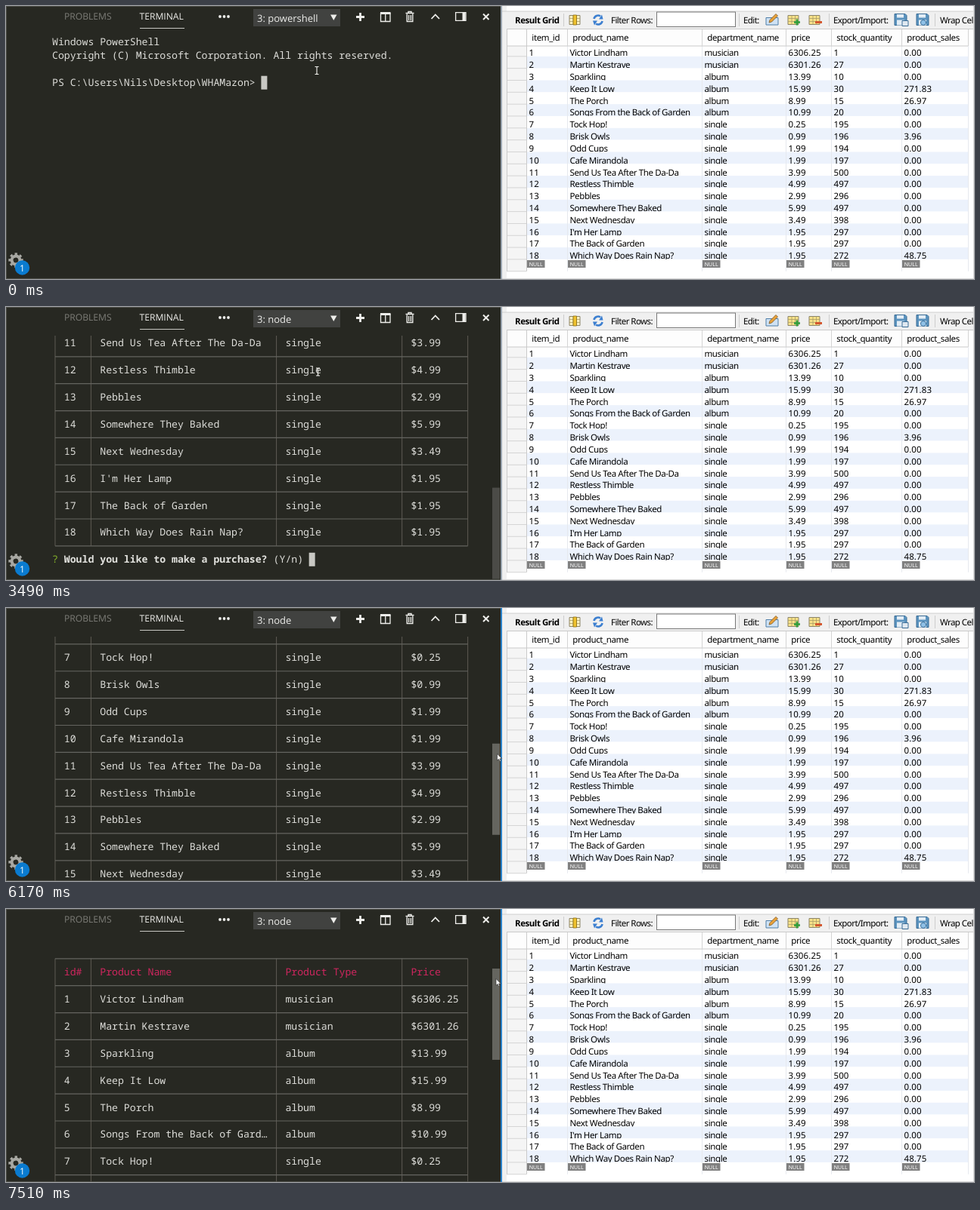
These frames come from a looping animation (1280 by 362 pixels, 8000 ms). An HTML page:

```html
<!DOCTYPE html>
<html lang="en">
<head>
<meta charset="utf-8">
<title>Terminal shop and result grid</title>
<style>
html, body { margin: 0; width: 100%; height: 100%; overflow: hidden; background: #fff; }
svg { display: block; width: 1280px; height: 362px; text-rendering: geometricPrecision; }
.mono { font: 13.18px "Noto Sans Mono", monospace; fill: #dededa; white-space: pre; }
.mono.red { fill: #d0265f; }
.mono.green { fill: #86b42b; }
.mono.yellow { fill: #f4f01c; }
.mono.bold { font-weight: 700; fill: #e2e2de; }
.ui { font: 12.1px "Open Sans", sans-serif; fill: #eeeeeb; }
.grid { font: 11.5px "Noto Sans", sans-serif; fill: #000; letter-spacing: -.38px; }
.grid.num { letter-spacing: .1px; }
.grid.bar { letter-spacing: -.56px; }
.grid.strong { font-weight: 700; letter-spacing: -.45px; }
.null { font: 7px "Noto Sans", sans-serif; fill: #fff; }
</style>
</head>
<body>
<svg id="stage" viewBox="0 0 1280 362" xmlns="http://www.w3.org/2000/svg">
  <defs><clipPath id="view"><rect x="0" y="38" width="643" height="324"/></clipPath></defs>
  <rect width="655" height="362" fill="#272822"/>
  <path d="M0 .5H655M.5 0V362M0 361.5H655" stroke="#4d4e48" fill="none"/>

  <g id="tabs">
    <text class="ui" x="77" y="18.3" style="fill:#7d7d78">PROBLEMS</text>
    <text class="ui" x="176.5" y="18.3">TERMINAL</text>
    <path d="M177 29.5H236" stroke="#c8c8c3"/>
    <g fill="#eeeeeb"><circle cx="283" cy="14" r="1.9"/><circle cx="288.5" cy="14" r="1.9"/><circle cx="294" cy="14" r="1.9"/></g>
    <rect x="327" y="4" width="115" height="23" fill="#414240"/>
    <text class="ui" id="shell" x="332" y="20.5" style="font-size:13px"></text>
    <path d="M429 11.5H437.500L433.250 19Z" fill="#eeeeeb"/>
    <g stroke="#eeeeeb" fill="none">
      <path d="M463 14.500H474M468.500 9V20" stroke-width="2.800"/>
      <path d="M495 9.500H508.500" stroke-width="3"/>
      <path d="M495.500 9V20.500H508V9M501.750 9V20" stroke-width="1.300"/>
      <path d="M528.500 9.500H539.500M532 9V7.500H536V9M530.200 10.500V20.500H537.800V10.500M532.600 12V19M535.400 12V19" stroke-width="1.400"/>
      <path d="M562.500 17L567.750 11.500L573 17" stroke-width="1.800"/>
      <path d="M594.600 8.600H608V19.400H594.600Z" stroke-width="1.300"/>
      <path d="M605.500 9V19" stroke-width="4"/>
      <path d="M631 10.500L638.500 18M638.500 10.500L631 18" stroke-width="2"/>
    </g>
  </g>

  <g clip-path="url(#view)"><g id="doc">
    <g id="intro"></g><g id="command"></g><g id="table"></g><g id="prompt"></g>
    <rect id="caret" width="8" height="18" fill="#c8c8c3"/>
  </g></g>
  <rect id="thumb" x="643" width="10" height="121"/>

  <g id="gear" transform="translate(13 337) rotate(-11.25)">
    <circle r="5.400" fill="none" stroke="#a8a8a3" stroke-width="4"/>
    <circle r="8.200" fill="none" stroke="#a8a8a3" stroke-width="3" stroke-dasharray="3.220 3.220"/>
  </g>
  <circle cx="21.500" cy="347" r="9.700" fill="#0a7bd0"/>
  <text class="ui" x="21.500" y="351.500" text-anchor="middle" style="fill:#fff">1</text>

  <rect x="654" width="626" height="362" fill="#fff"/>
  <rect x="656" width="6" height="362" fill="#f0f0f0"/>
  <rect x="656" y="7" width="624" height="23" fill="#f0f0f0"/>
  <path d="M656 7H1280" stroke="#d0d0d0"/>
  <rect id="edge" x="654" width="2" height="362"/>
  <g id="toolbar"></g>
  <g id="grid"></g>

  <path id="beam" d="M-2.500 -5H-.7L0 -4.300L.7 -5H2.500M0 -4.300V4.300M-2.500 5H-.7L0 4.300L.7 5H2.500" fill="none" stroke="#f4f4f0" stroke-width="1.100"/>
  <path id="arrow" d="M0 0V8.800L2.100 7L3.500 10L4.900 9.400L3.600 6.500H6.300Z" fill="#fff" stroke="#222" stroke-width=".6"/>
</svg>
<script>
const NS = 'http://www.w3.org/2000/svg';
const $ = id => document.getElementById(id);

function add(parent, tag, attrs, content) {
  const el = document.createElementNS(NS, tag);
  for (const k in attrs) el.setAttribute(k, attrs[k]);
  if (content !== undefined) el.textContent = content;
  parent.appendChild(el);
  return el;
}

const items = `Victor Lindham|musician|6306.25|1|0.00
Martin Kestrave|musician|6301.26|27|0.00
Sparkling|album|13.99|10|0.00
Keep It Low|album|15.99|30|271.83
The Porch|album|8.99|15|26.97
Songs From the Back of Garden|album|10.99|20|0.00
Tock Hop!|single|0.25|195|0.00
Brisk Owls|single|0.99|196|3.96
Odd Cups|single|1.99|194|0.00
Cafe Mirandola|single|1.99|197|0.00
Send Us Tea After The Da-Da|single|3.99|500|0.00
Restless Thimble|single|4.99|497|0.00
Pebbles|single|2.99|296|0.00
Somewhere They Baked|single|5.99|497|0.00
Next Wednesday|single|3.49|398|0.00
I'm Her Lamp|single|1.95|297|0.00
The Back of Garden|single|1.95|297|0.00
Which Way Does Rain Nap?|single|1.95|272|48.75`
  .split('\n').map((line, i) => [String(i + 1), ...line.split('|')]);

// Terminal text sits on a character grid
const CW = 7.908, LH = 17.93, TOP = 7;
const colX = c => 61 + c * CW;
const lineY = n => 47.9 + n * LH;
const put = (id, col, line, str, cls = '') =>
  add($(id), 'text', { class: 'mono ' + cls, x: colX(col), y: lineY(line) + 4.5 }, str);

const path = 'PS C:\\Users\\Nils\\Desktop\\WHAMazon>';
put('intro', 0, 0, 'Windows PowerShell');
put('intro', 0, 1, 'Copyright (C) Microsoft Corporation. All rights reserved.');
put('intro', 0, 3, path);
put('command', 0, 4, path);
put('command', 35, 4, 'node', 'yellow');
put('command', 40, 4, '.\\whamazonCustomer.js');

function buildTable() {
  const box = $('table'), edges = [0, 6, 37, 58, 69].map(c => colX(c + .5));
  const last = TOP + 2 * items.length + 2;
  for (const x of edges)
    add(box, 'path', { d: `M${x} ${lineY(TOP)}V${lineY(last)}`, stroke: '#595650', 'stroke-width': 1.1 });
  for (let n = TOP; n <= last; n += 2)
    add(box, 'path', { d: `M${edges[0]} ${lineY(n)}H${edges[4]}`, stroke: '#64645f', 'stroke-width': 1.2 });
  const cells = [2, 8, 39, 60];
  ['id#', 'Product Name', 'Product Type', 'Price'].forEach((s, c) => put('table', cells[c], TOP + 1, s, 'red'));
  items.forEach(([id, name, type, price], i) => {
    const short = name.length > 28 ? name.slice(0, 27) + '…' : name;
    [id, short, type, '$' + price].forEach((s, c) => put('table', cells[c], TOP + 3 + 2 * i, s));
  });
}

const ASK = TOP + 39;
put('prompt', 0, ASK, '?', 'green');
put('prompt', 2, ASK, 'Would you like to make a purchase?', 'bold');
put('prompt', 37, ASK, '(Y/n)');

function buildGrid() {
  const g = $('grid'), top = 51, pitch = 15.83;
  const cols = [688.5, 742.5, 920.5, 1031.5, 1091.5, 1184.5, 1272.5];
  const titles = ['item_id', 'product_name', 'department_name', 'price', 'stock_quantity', 'product_sales'];
  const rowTop = i => top + i * pitch;
  // Each row's background trims the descenders of the row above
  for (let i = 0; i <= items.length; i++) {
    add(g, 'rect', { x: 689, y: rowTop(i), width: 583, height: pitch, fill: i % 2 ? '#ecf2fc' : '#fff' });
    (items[i] || []).forEach((s, c) =>
      add(g, 'text', { class: 'grid' + (c === 1 || c === 2 ? '' : ' num'), x: cols[c] + 3, y: rowTop(i) + 15.2 }, s));
  }
  const end = rowTop(items.length + 1);
  cols.forEach((x, c) => c && add(g, 'path', { d: `M${x} 53V${end}`, stroke: '#e6e9ee' }));
  add(g, 'rect', { x: 662, y: 30, width: 27, height: end - 30, fill: '#f5f5f5' });
  for (let i = 1; i <= items.length + 1; i++)
    add(g, 'path', { d: `M662 ${rowTop(i)}H688`, stroke: '#d4d4d4' });
  add(g, 'rect', { x: 662, y: 30, width: 611, height: 23, fill: '#fdfdfd' });
  add(g, 'path', { d: `M662 30.5H1280M662 53H1272M662.5 30V${end}M688.5 30V${end}`, stroke: '#cacaca', fill: 'none' });
  titles.forEach((s, c) => {
    add(g, 'text', { class: 'grid', x: cols[c] + 6.8, y: 45.8 }, s);
    add(g, 'path', { d: `M${cols[c + 1]} 31V53`, stroke: '#d4d4d4' });
    add(g, 'rect', { x: cols[c] + .5, y: 337, width: 23.5, height: 10, fill: '#808080' });
    add(g, 'text', { class: 'null', x: cols[c] + 12.2, y: 344.6, 'text-anchor': 'middle' }, 'NULL');
  });
  add(g, 'path', { d: 'M1279.5 0V362M656 361.500H1280', stroke: '#dcdcdc', fill: 'none' });
}

function buildToolbar() {
  const g = $('toolbar');
  const label = (x, s, cls = 'bar') => add(g, 'text', { class: 'grid ' + cls, x, y: 22.8 }, s);
  const shape = (d, fill, stroke = 'none', w = 1) => add(g, 'path', { d, fill, stroke, 'stroke-width': w });
  label(673, 'Result Grid', 'strong');
  label(800, 'Filter Rows:');
  label(975, 'Edit:');
  label(1094, 'Export/Import:');
  label(1235, 'Wrap Cell Content:');
  shape('M737.5 10V27M969.5 10V27M1088.5 10V27M1228.5 10V27', 'none', '#cdcdcd');
  add(g, 'rect', { x: 860.5, y: 8, width: 104, height: 19.5, fill: '#fff', stroke: '#777' });

  const sheet = (x, tint) => {
    shape(`M${x} 12.5h14v12h-14z`, tint, '#8a8368');
    shape(`M${x} 16.5h14M${x} 20.5h14M${x + 5} 12.5v12M${x + 9.5} 12.5v12`, 'none', '#a99c66', .8);
  };
  sheet(745, '#fff3c4');
  shape('M750 12h4.500v13h-4.500z', '#efc22e', '#8a6d14', .8);

  shape('M777.5 17A5.500 5.500 0 0 1 786 13.500M788.500 20A5.500 5.500 0 0 1 780 23.500', 'none', '#3c7fd0', 2.6);
  shape('M784 17.500L789.500 17.500L788 11.500ZM782 19.500L776 19.500L778 25.500Z', '#3c7fd0');

  shape('M1005 15.500h16v9.500h-16z', '#cfe2f4', '#4f7ea8');
  shape('M1009 22L1010 18.500L1018 10.500L1020.500 13L1012.500 21Z', '#e9a23a', '#7a5520', .8);
  sheet(1034, '#f8e28a');
  shape('M1042 21.500h8M1046 17.500v8', 'none', '#2f9d3c', 2.6);
  sheet(1062, '#f8e28a');
  shape('M1070 21.500h9', 'none', '#d4572e', 3);

  for (const x of [1175, 1204]) {
    shape(`M${x} 10.500h14l2 2v13h-16z`, '#5b93be', '#3a6c96');
    shape(`M${x + 3} 11h9v4.500h-9zM${x + 3} 18.500h10v7h-10z`, '#e3edf5');
  }
  shape('M1185 19.500h8v7h-8z', '#dfe8f0', '#3a6c96');
  shape('M1213 18.500a3.500 3.500 0 1 0 .1 0z', '#8fc0e6', '#3a6c96');
}

buildTable();
buildGrid();
buildToolbar();

// Pointer path: time, x, y
const pointer = [
  [0, 411, 85.5], [3490, 412.5, 86], [3610, 423, 99], [3730, 435, 114],
  [4130, 446, 122], [4250, 500, 156], [4370, 568, 204], [4490, 614, 230.5],
  [4630, 632, 244], [4760, 648, 256], [4880, 655, 257], [5020, 651, 256], [5160, 650.5, 256],
  [5590, 648.5, 234], [5710, 649.5, 230]
];
// Thumb drag: time, lines below the top of the table view
const drag = [
  [0, 24], [5590, 23], [5710, 21], [5870, 18.2], [6020, 16.3], [6170, 15.1],
  [6290, 14], [6410, 12.6], [6560, 10.2], [6680, 8], [6830, 6.1], [6980, 4.6],
  [7130, 2.9], [7270, 1.8], [7390, .8], [7510, .1]
];
const at = (keys, t) => keys.filter(k => k[0] <= t).pop();
const show = (id, on) => $(id).setAttribute('visibility', on ? 'visible' : 'hidden');
const fill = (id, color) => $(id).setAttribute('fill', color);
const move = (id, x, y) => $(id).setAttribute('transform', `translate(${x} ${y})`);

function caretAt(t) {
  if (t < 880) return [35, 3];
  if (t < 1540) return [61, 4];
  if (t < 2190) return [0, 5];
  return t < 2310 ? [0, ASK] : [43, ASK];
}

function draw(t) {
  const listed = t >= 2190, scroll = at(drag, t)[1];
  $('shell').textContent = t < 1540 ? '3: powershell' : '3: node';
  show('command', t >= 880);
  show('table', listed);
  show('prompt', t >= 2310);
  move('doc', 0, listed ? -(TOP - 1 + Math.round(scroll)) * LH : 0);
  const [col, line] = caretAt(t);
  move('caret', colX(col) - .4, lineY(line) - 9);

  const thumbY = 38 + 6.72 * (TOP - 1 + scroll);
  show('thumb', listed);
  $('thumb').setAttribute('y', thumbY);
  fill('thumb', t < 4880 ? '#4b4b47' : t < 5440 ? '#525250' : '#65655f');
  // The window edge turns blue once the pointer has crossed it
  fill('edge', t < 5020 ? '#98a3ae' : '#2a82c9');

  let [, x, y] = at(pointer, t);
  if (t >= 5710) y = thumbY + 13.5;
  if (t >= 7510) x = 648;
  const inText = t < 4760;
  show('beam', inText);
  show('arrow', !inText);
  move(inText ? 'beam' : 'arrow', x, y);
}

const start = performance.now();
function tick() {
  draw((performance.now() - start) % 8000);
  requestAnimationFrame(tick);
}
tick();
</script>
</body>
</html>
```
